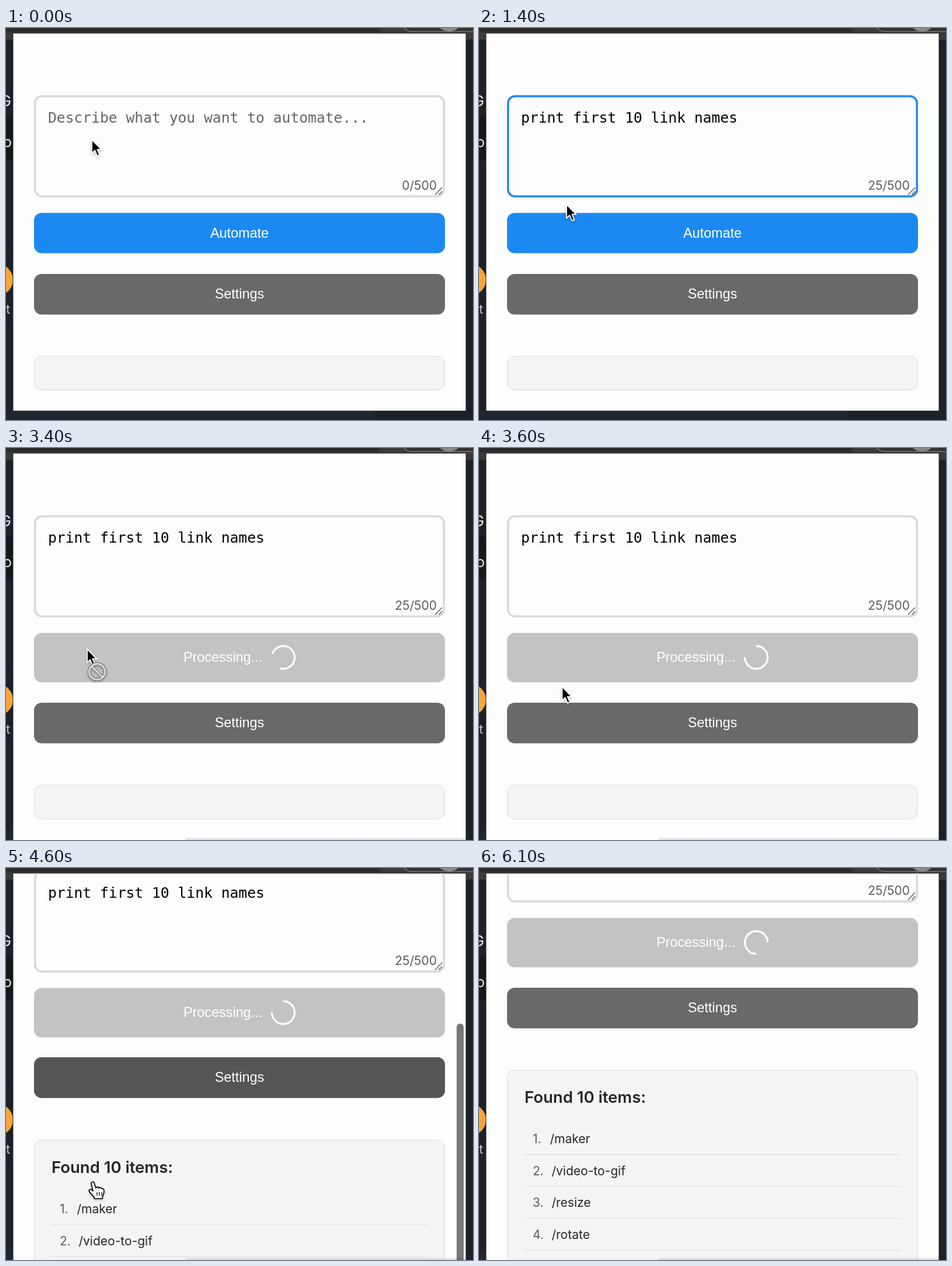
These frames come from a looping animation (800x671 px, 6200 ms). An HTML page:

```html
<!DOCTYPE html>
<html lang="en">
<head>
<meta charset="utf-8">
<title>Automation popup</title>
<style>
  html, body { margin: 0; height: 100%; overflow: hidden; background: #1c2228; }
  svg { display: block; width: 100vw; height: 100vh; }
  text { font: 21px Inter, sans-serif; white-space: pre; }
  .mono { font: 24.65px "DejaVu Sans Mono", monospace; }
  .btn { font: 23.4px "Liberation Sans", Arial, sans-serif; fill: #fff; text-anchor: middle; }
  .side { font-size: 25px; fill: #e8eaec; text-anchor: end; }
</style>
</head>
<body>
<svg viewBox="0 0 800 671">
  <defs>
    <clipPath id="view"><rect x="12" y="9" width="776" height="662"/></clipPath>
    <linearGradient id="shade" x2="0" y2="1">
      <stop offset="0" stop-color="#000" stop-opacity="0"/>
      <stop offset="1" stop-color="#000" stop-opacity=".14"/>
    </linearGradient>
    <filter id="soft" x="-20%" y="-20%" width="140%" height="150%">
      <feDropShadow dx="0" dy="2" stdDeviation="2" flood-opacity=".25"/>
    </filter>
  </defs>

  <!-- page behind the popup -->
  <rect width="800" height="671" fill="#1c2228"/>
  <rect width="800" height="20" fill="#3b3b3c"/>
  <rect width="640" height="7" fill="#2b2b2c"/>
  <rect x="674" y="-40" width="160" height="46" rx="23" fill="#333" stroke="#777" stroke-width="1.5"/>
  <circle cx="759" cy="-18" r="24" fill="#888"/>
  <rect y="152" width="12" height="73" fill="#15181c"/>
  <path d="M0 370.500H12M0 503.500H12" stroke="#11151a"/>
  <rect y="655" width="630" height="16" fill="#20272e"/>
  <text class="side" x="9" y="134">G</text>
  <text class="side" x="10" y="204">o</text>
  <text class="side" x="7" y="489" style="font-size:21px" fill-opacity=".85">t</text>
  <circle cx="-15" cy="431" r="27" fill="#f5a53a"/>

  <!-- popup -->
  <rect id="panel" x="12" y="9" width="776" fill="#fdfdfe" stroke="#15191d" stroke-width=".8"/>
  <g clip-path="url(#view)">
    <g id="content">
      <g id="banner" filter="url(#soft)">
        <rect x="48" y="-43" width="691" height="67" rx="13" fill="#4ba64f"/>
        <path d="M62-43H726a13 13 0 0 1 13 13V11a13 13 0 0 1-13 13H62Q55 22 55 11V-30Q55-41 62-43Z" fill="#e2f1e3"/>
      </g>
      <text id="notice" x="76" y="-2" fill="#43a047">Successfully extracted 10 items</text>

      <rect x="49.750" y="116.750" width="700.500" height="171.500" rx="12" fill="none" stroke="#d9d9da" stroke-width="3.500"/>
      <rect id="focus" x="49.750" y="116.750" width="700.500" height="171.500" rx="12" fill="none" stroke="#1e8bf0" stroke-width="3.500"/>
      <text id="prompt" class="mono" x="72" y="162"></text>
      <text id="count" x="738" y="277" text-anchor="end" fill="#5c5c5c"></text>
      <path d="M735 285.500L747 273M741.500 285.500L747 279.500" stroke="#666" stroke-width="1.600"/>

      <rect id="run" x="48" y="316.500" width="704" rx="13"/>
      <text id="runLabel" class="btn"></text>
      <path id="spinner" d="M13.800-13.800A19.500 19.500 0 1 0 13.800 13.800" fill="none" stroke="#fff" stroke-width="3.300"/>

      <g id="settings">
        <rect x="48" y="421" width="704" height="69.500" rx="13" fill="#696969"/>
        <rect id="hover" x="48" y="421" width="704" height="69.500" rx="13" fill="#555"/>
        <text class="btn" x="400" y="463">Settings</text>
      </g>

      <rect id="box" x="48.800" width="702.400" rx="13" fill="#f4f4f6" stroke="#e5e5e7" stroke-width="1.700"/>
      <g id="list">
        <text x="78" y="633" fill="#26262a" style="font-size:27.500px;font-weight:600">Found 10 items:</text>
      </g>
    </g>
    <rect id="thumb" x="772" width="12" height="900" rx="6" fill="#777"/>
    <rect id="edge" x="308" y="666" width="480" height="5" fill="url(#shade)"/>
  </g>

  <!-- pointer -->
  <g id="pointer" filter="url(#soft)" stroke-linejoin="round">
    <g id="arrow">
      <path d="M0 0V23.500L5.300 18.500L9.300 28L13.300 26.300L9.300 17H16.500Z" fill="#000" stroke="#fff" stroke-width="1.800"/>
      <g id="denied" fill="none">
        <circle cx="17" cy="39" r="13.500" stroke="#777" stroke-width="5.500"/>
        <path d="M8 30L26 48" stroke="#777" stroke-width="5"/>
        <circle cx="17" cy="39" r="13.500" stroke="#ddd" stroke-width="3"/>
        <path d="M8 30L26 48" stroke="#ddd" stroke-width="2.800"/>
      </g>
    </g>
    <g id="hand" fill="#fff" stroke="#000" stroke-width="1.700">
      <path d="M-3 2C-3-1 1-2 2 1L5 10C6 7 10 8 10 10C12 8 14 9 15 11C17 10 19 12 19 15C19 21 16 22 16 28H3C2 24-4 20-6 16C-8 13-5 11-2 13L0 15Z"/>
      <path d="M7 17V23M11 17V23M15 17V23" fill="none" stroke-width="1.300"/>
    </g>
  </g>
</svg>
<script>
const LOOP = 6200, STEP = 100;
const el = id => document.getElementById(id);
const set = (id, attrs) => {
  for (const name in attrs) el(id).setAttribute(name, attrs[name]);
};
const show = (id, on) => set(id, { opacity: +on });
const ramp = (t, from, to) => Math.min(1, Math.max(0, (t - from) / (to - from)));

// Linear interpolation between [time, value] keys.
function track(t, keys) {
  let value = keys[0][1];
  for (let i = 1; i < keys.length; i++) {
    value += (keys[i][1] - keys[i - 1][1]) * ramp(t, keys[i - 1][0], keys[i][0]);
  }
  return value;
}

const FOCUS = 700, PASTE = 1000, CLICK = 1600, DONE = 3900;
const PROMPT = 'print first 10 link names';
const scrollKeys = [[4100, 88], [4200, 70], [4300, 30], [4600, -111],
  [4900, -205], [5100, -233], [5600, -233], [5700, -231]];
const pointerX = [[1100, 147], [1400, 150], [1600, 139], [3500, 139], [3800, 149],
  [5000, 149], [5500, 150], [5900, -40]];
const pointerY = [[1100, 191], [1400, 302], [1600, 344], [3500, 344], [3800, 538],
  [5000, 538], [5100, 534]];

const items = ['/maker', '/video-to-gif', '/resize', '/rotate'];
items.forEach((name, i) => {
  const y = 702 + i * 54.7;
  el('list').insertAdjacentHTML('beforeend',
    `<text x="92" y="${y}" fill="#5c5c60">${i + 1}.</text>
     <text x="${i ? 124.5 : 121.5}" y="${y}" fill="#26262a">${name}</text>
     <path d="M78 ${y + 19.3}H722" stroke="#e4e4e7" stroke-width="1.700"/>`);
});

function draw(t) {
  const pasted = t >= PASTE, busy = t >= CLICK, done = t >= DONE;
  const grow = busy ? 15 : 0;
  const shift = done ? track(t, scrollKeys) : 0;
  const hover = ramp(t, 3700, 3900) - ramp(t, 5500, 5700);

  set('panel', { height: busy ? 700 : 646.5 });
  set('content', { transform: `translate(0 ${shift})` });
  show('banner', done);
  show('notice', done);
  set('focus', { opacity: ramp(t, FOCUS - 100, FOCUS + 100) - ramp(t, CLICK - 100, CLICK + 100) });

  el('prompt').textContent = pasted ? PROMPT : 'Describe what you want to automate...';
  set('prompt', { fill: pasted ? '#000' : '#666' });
  el('count').textContent = `${pasted ? PROMPT.length : 0}/500`;

  set('run', { height: busy ? 84.5 : 69, fill: busy ? '#c3c3c3' : '#1c89f2' });
  el('runLabel').textContent = busy ? 'Processing...' : 'Automate';
  set('runLabel', { x: busy ? 371.5 : 400, y: busy ? 366 : 358.5 });
  show('spinner', busy);
  set('spinner', { transform: `translate(475 358.5) rotate(${0.36 * t + 9})` });

  set('settings', { transform: `translate(0 ${grow - hover})` });
  set('hover', { opacity: hover });
  set('box', { y: 562 + grow, height: done ? 700 : 58 });
  show('list', done);
  set('thumb', { y: 144 + (70 - shift) * 0.676, opacity: done ? 1 - ramp(t, 5200, 5500) : 0 });
  show('edge', busy);

  const overLink = t >= 3800 && t < 5000;
  set('pointer', { transform: `translate(${track(t, pointerX)} ${track(t, pointerY)})` });
  show('arrow', !overLink);
  show('hand', overLink);
  show('denied', busy && t < 3600);
}

function tick() {
  draw(Math.floor(performance.now() % LOOP / STEP) * STEP);
  requestAnimationFrame(tick);
}
tick();
</script>
</body>
</html>
```
